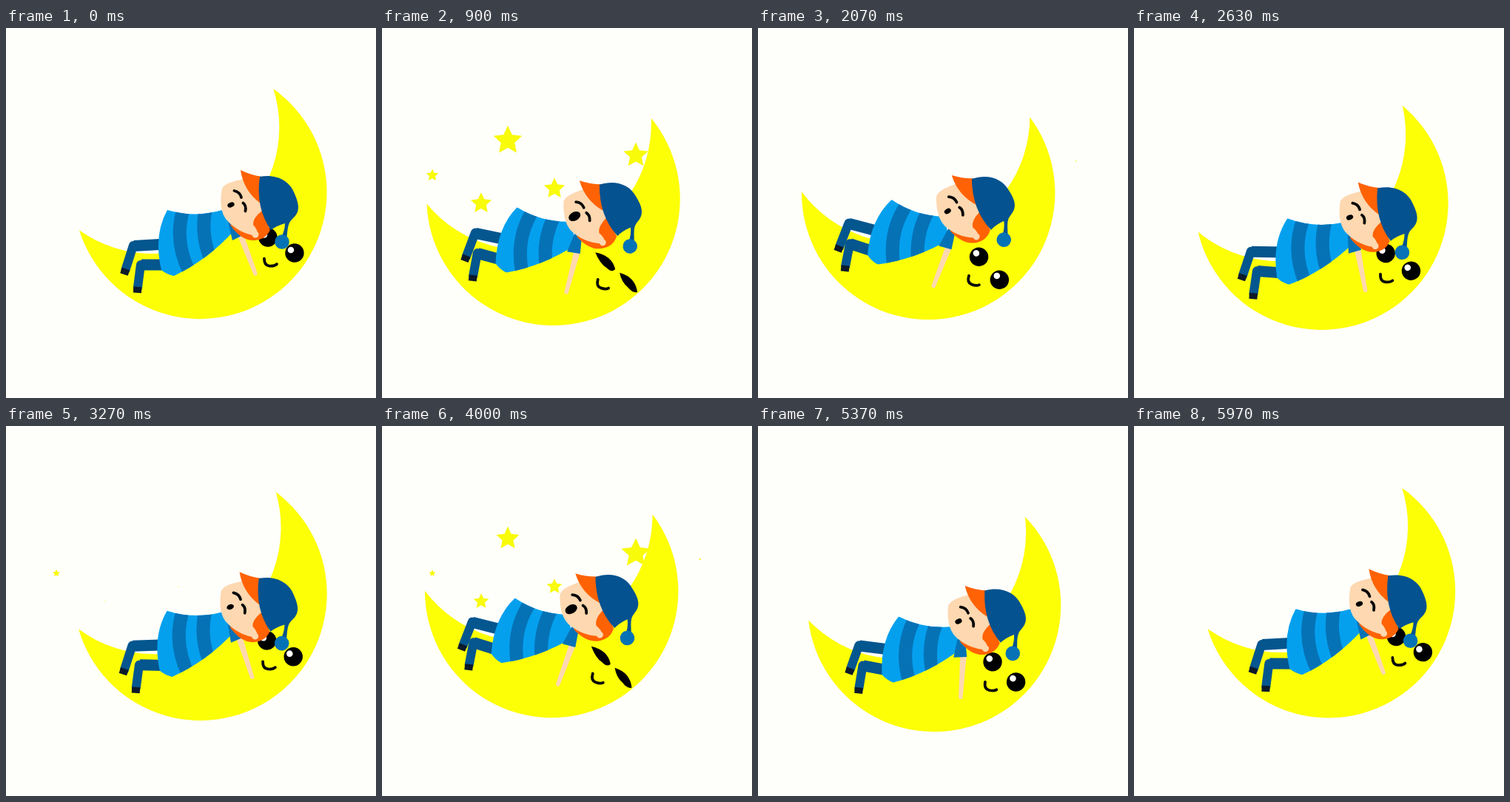
These frames come from a looping animation (500 by 500 pixels, 6010 ms). An HTML page:

```html
<!DOCTYPE html>
<html lang="en">
<head>
<meta charset="utf-8">
<title>Sleeping on the moon</title>
<style>
html, body { margin: 0; height: 100%; overflow: hidden; background: #fefefb; }
svg { display: block; width: 100vw; height: 100vh; }
.line { fill: none; stroke: #080808; stroke-width: 3.8; stroke-linecap: round; }
.leg { fill: none; stroke: #04568f; }
.shoe { fill: none; stroke: #0c1a2a; stroke-width: 11; }
.hair { fill: #ff6204; }
.skin { fill: #fdd8b0; }
.band { fill: none; stroke: #0672b6; stroke-width: 18; }
</style>
</head>
<body>
<svg viewBox="0 0 500 500">
  <defs>
    <clipPath id="dress">
      <path d="M218 246Q255 257 292 246L309 273Q272 314 227 335Q217 333 210 327Q199 280 218 246Z"/>
    </clipPath>
  </defs>
  <g id="stars" fill="#f8fb0a"></g>
  <g id="moon">
    <path fill="#fdff06" d="M361.200 82.200A171.200 171.200 0 1 1 99 273.300A171 171 0 0 0 361.200 82.200Z"/>
    <g id="open">
      <circle cx="354" cy="283" r="12.7"/><circle cx="390" cy="304" r="12.7"/>
      <g fill="#fff"><circle cx="349" cy="279.5" r="4.3"/><circle cx="385" cy="300" r="4.3"/></g>
    </g>
    <path id="closed" d="M336 277Q359 275 368 292Q365 298 356 293Q346 290 336 277ZM375 295Q397 295 405 314Q399 317 391 311Q381 307 375 295Z"/>
    <path class="line" d="M349 311.500Q349 321 356 321.500Q363 322 366 319"/>

    <path class="leg" stroke-width="15" d="M216 292L173 294.500"/>
    <path class="leg" stroke-width="15" d="M225 320L183 320"/>
    <g class="shin" data-pivot="172,292">
      <path class="leg" stroke-width="12" stroke-linecap="round" d="M172 294L161.500 327"/>
      <path class="shoe" d="M162 325.500L159.500 333"/>
    </g>
    <g class="shin" data-pivot="181,318">
      <path class="leg" stroke-width="12" stroke-linecap="round" d="M182 320L178 351"/>
      <path class="shoe" d="M178 350L177.500 358"/>
    </g>

    <g clip-path="url(#dress)">
      <path fill="#04a0ee" d="M190 230H320V345H190Z"/>
      <path class="band" d="M248 224Q218 284 256 344"/>
      <path class="band" d="M281 213Q251 273 287 333"/>
    </g>
    <g id="arm">
      <path class="skin" d="M313 281L321 278L340 332Q339 336 335 334Z"/>
      <path fill="#0672b6" d="M299 257L311 260L322 279L306 287Z"/>
    </g>

    <g id="head">
      <path class="hair" d="M303 266Q318 288 336 287Q350 286 356 275L340 260Z"/>
      <path class="skin" d="M324 204Q296 208 292 217Q287 244 297 258Q311 275 333 280L352 265L346 205Z"/>
      <path class="hair" d="M317 192Q331 199 347 201L344 237Q321 220 317 192Z"/>
      <path class="hair" d="M346 247Q333 257 334 266Q340 272 341 281L357 274L352 258Z"/>
      <circle class="skin" cx="337" cy="279" r="4.500"/>
      <path fill="#045290" d="M343 201C366 197 384 207 390 224C398 242 396 250 387 258C380 264 381 273 379 285L372 283Q377 273 377 264Q366 267 358 273Q337 243 343 201Z"/>
      <circle fill="#0672b6" cx="373" cy="289" r="9.800"/>
      <path class="line" d="M308.500 220Q316 221.500 318 229M320.500 236.500Q325 240 323.500 247.500"/>
      <ellipse id="mouth" rx="4.800" ry="3.300"/>
    </g>
  </g>
</svg>
<script>
const PERIOD = 3005;
const $ = id => document.getElementById(id);
const shins = [...document.querySelectorAll('.shin')];

// Path of the moon's centre: time, x, y
const path = [
  [0, 263, 223], [130, 264.5, 222], [270, 263, 228], [620, 244, 248],
  [900, 232, 232], [1000, 229.5, 224], [1500, 231, 197], [1770, 231.5, 204],
  [2070, 230.5, 224], [2400, 240, 244], [2700, 258, 235], [2880, 265, 228]
];

// Star: x, y, start, end, largest radius
const stars = [
  [68, 199, 140, 1110, 20], [134, 237, 245, 1257, 21], [233, 217, 245, 1257, 21],
  [170, 152, 378, 1388, 21], [343, 172, 480, 1490, 21], [430, 180, 960, 2095, 27]
].map(([x, y, start, end, size]) => {
  const points = Array.from({ length: 10 }, (_, i) => {
    const r = i % 2 ? 0.48 : 1, a = i * Math.PI / 5;
    return `${r * Math.sin(a)},${-r * Math.cos(a)}`;
  });
  const node = document.createElementNS('http://www.w3.org/2000/svg', 'polygon');
  node.setAttribute('points', points.join(' '));
  $('stars').append(node);
  return { node, x, y, start, end, size };
});

function knot(i) {
  const n = path.length, turn = Math.floor(i / n);
  const [t, x, y] = path[i - turn * n];
  return [t + turn * PERIOD, x, y];
}

// Smooth closed curve through the path's points
function centre(t) {
  let i = 0;
  while (knot(i + 1)[0] <= t) i++;
  const [a, b, c, d] = [-1, 0, 1, 2].map(k => knot(i + k));
  const h = c[0] - b[0], u = (t - b[0]) / h;
  return [1, 2].map(k => {
    const m = (c[k] - a[k]) / (c[0] - a[0]) * h;
    const n = (d[k] - b[k]) / (d[0] - b[0]) * h;
    const p = b[k], q = c[k];
    return p + u * (m + u * (3 * (q - p) - 2 * m - n + u * (2 * (p - q) + m + n)));
  });
}

const place = (node, value) => node.setAttribute('transform', value);

function draw(now) {
  const t = now % PERIOD;
  const tilt = 12.4 * (1 - Math.cos((t - 40) / PERIOD * 2 * Math.PI));
  const [x, y] = centre(t);
  place($('moon'), `translate(${x - 263} ${y - 223}) rotate(${tilt} 263 223)`);
  place($('head'), `rotate(${-1.5 * tilt} 296 257.5)`);
  place($('arm'), `rotate(${1.34 * tilt} 305 267)`);
  shins.forEach(s => place(s, `rotate(${-0.8 * tilt},${s.dataset.pivot})`));

  const yawn = t > 150 && t < 1850 ? Math.sin((t - 150) / 1700 * Math.PI) ** 2 : 0;
  place($('mouth'), `translate(304 239) rotate(-20) scale(${1 + 0.8 * yawn})`);

  const asleep = t > 500 && t < 1400;
  $('open').style.display = asleep ? 'none' : '';
  $('closed').style.display = asleep ? '' : 'none';

  for (const s of stars) {
    const u = (t - s.start) / (s.end - s.start);
    const r = s.size * Math.max(0, 1 - Math.abs(2 * u - 1));
    place(s.node, `translate(${s.x} ${s.y}) scale(${r})`);
  }
}

const begin = performance.now();
function frame() {
  draw(performance.now() - begin);
  requestAnimationFrame(frame);
}
frame();
</script>
</body>
</html>
```
